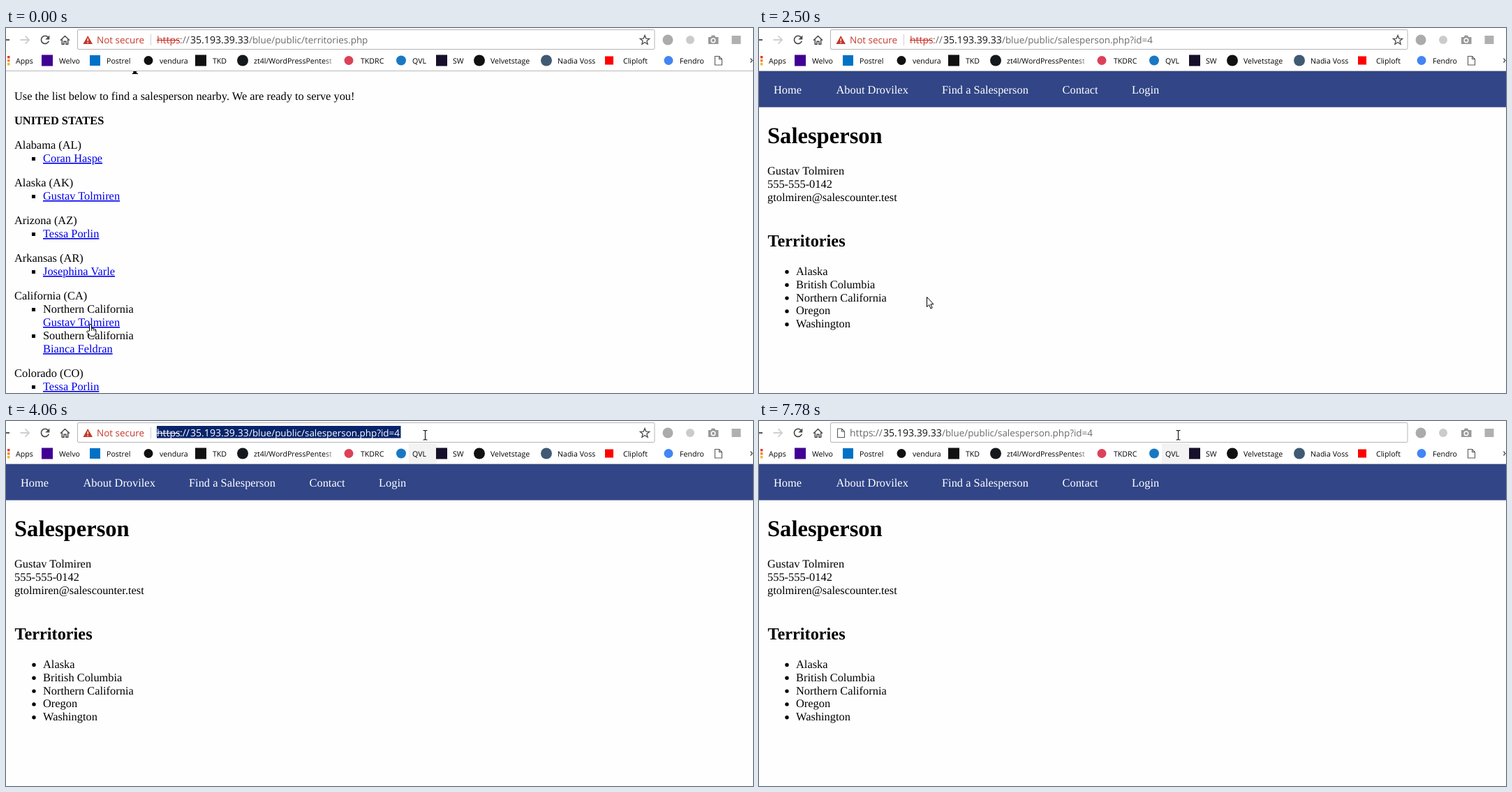
Write an HTML page that moves like this. It is 1070 px wide and 523 px high and loops after 8000 ms.

```html
<!DOCTYPE html>
<html>
<head>
<meta charset="utf-8">
<style>
  html, body { margin: 0; width: 100%; height: 100%; overflow: hidden; background: #fefefe; }
  svg { display: block; }
  text { white-space: pre; text-rendering: geometricPrecision; }
  .page text { font-family: "Liberation Serif", "Times New Roman", serif; }
  .ui text { font-family: "Open Sans", "Noto Sans", sans-serif; }
  .hidden { display: none; }
</style>
</head>
<body>
<svg id="stage" width="1070" height="523" viewBox="0 0 1070 523"></svg>
<script>
const LOOP = 8000, BODY = 16.4;

const text = (x, y, str, size = BODY, fill = "#000", extra = "") =>
  `<text x="${x}" y="${Math.round(y)}" font-size="${size}" fill="${fill}" ${extra}>${str}</text>`;
const rect = (x, y, w, h, fill, extra = "") =>
  `<rect x="${x}" y="${y}" width="${w}" height="${h}" fill="${fill}" ${extra}/>`;
const circle = (x, y, r, fill) => `<circle cx="${x}" cy="${y}" r="${r}" fill="${fill}"/>`;
const path = (d, stroke, width = 1, fill = "none") =>
  `<path d="${d}" stroke="${stroke}" stroke-width="${width}" fill="${fill}"/>`;
const group = (id, content, cls = "") => `<g id="${id}" class="${cls}">${content}</g>`;
const bold = 'font-weight="bold"';

// Territory list: each entry is a state and its lines; links start with "@"
const agent = "Gustav Tolmiren";
const states = [
  ["Alabama (AL)", "@Coran Haspe"],
  ["Alaska (AK)", "@" + agent],
  ["Arizona (AZ)", "@Tessa Porlin"],
  ["Arkansas (AR)", "@Josephina Varle"],
  ["California (CA)", "Northern California", "@" + agent, "Southern California", "@Bianca Feldran"],
  ["Colorado (CO)", "@Tessa Porlin"],
];

function territoriesPage() {
  let out = text(12, 59, "Find a Salesperson", 32.6, "#000", bold)
    + text(12, 103, "Use the list below to find a salesperson nearby. We are ready to serve you!")
    + text(12, 138, "UNITED STATES", BODY, "#000", bold);
  let y = 173.3;
  for (const [state, ...lines] of states) {
    out += text(12, y, state);
    lines.forEach((line, i) => {
      y += 18.8;
      const link = line[0] === "@";
      if (i % 2 === 0) out += rect(37, Math.round(y) - 7, 5, 5, "#000");
      out += link
        ? text(53, y, line.slice(1), BODY, "#00e", 'text-decoration="underline"')
        : text(53, y, line);
    });
    y += 35.2;
  }
  return out;
}

function salespersonPage() {
  const nav = [[21, "Home"], [110.5, "About Drovilex"], [262, "Find a Salesperson"], [434.5, "Contact"], [534, "Login"]];
  const areas = ["Alaska", "British Columbia", "Northern California", "Oregon", "Washington"];
  return rect(0, 62, 1070, 51.5, "#314587")
    + nav.map(([x, label]) => text(x, 94, label, BODY, "#fff")).join("")
    + text(12, 165, "Salesperson", 32.6, "#000", bold)
    + [agent, "555-555-0142", "gtolmiren@salescounter.test"].map((s, i) => text(12, 210 + i * 19, s)).join("")
    + text(12.5, 313, "Territories", 24.3, "#000", bold)
    + areas.map((s, i) => circle(40, 349.5 + i * 18.8, 2.7, "#000") + text(53, 354 + i * 18.8, s)).join("");
}

// The address, in pieces; `selected` overrides all colours
function address(dx, file, scheme, selected) {
  const insecure = scheme === "red";
  const rest = selected || "#6a6a6a";
  return text(216 + dx, 22, "https", 14, selected || (insecure ? "#c5392b" : "#6a6a6a"))
    + (insecure ? path(`M${216 + dx} 17.5h32`, selected || "#c5221f") : "")
    + text(249 + dx, 22, "://", 14, rest)
    + text(264 + dx, 22, "35.193.39.33", 14.1, selected || "#111")
    + text(348 + dx, 22, "/blue/public/", 13.4, rest)
    + text(428 + dx, 22, file, 13.4, rest);
}

const fileIcon = (x, y) => path(`M${x} ${y}h6l4 4v8.5h-10zM${x + 6} ${y}v4h4`, "#5a5a5a", 1.1, "#fff");

function bookmarks() {
  const items = [
    [14, "Apps"], [76, "Welvo"], [144, "Postrel"], [220, "vendura"], [296, "TKD"],
    [355, "zt4l/WordPressPentest"], [508, "TKDRC"], [582, "QVL"], [640, "SW"],
    [694, "Velvetstage"], [790, "Nadia Voss"], [884, "Cliploft"], [965, "Fendro"],
  ];
  const squares = [[51, 16, "#410093"], [120, 15, "#0072c6"], [271, 16, "#111"], [616, 16, "#16102a"], [858, 12, "#f00"]];
  const discs = [[204, 6.5, "#111"], [339, 8, "#15181c"], [491, 6.5, "#dc4158"], [566, 7, "#1a78c2"],
    [678, 8, "#111"], [774, 8, "#3f5b73"], [949, 6.5, "#4285f4"]];
  return ["#e0402f", "#f0872c", "#f3b72a"].map((c, i) => rect(2, 40 + i * 5, 3.5, 3.5, c)).join("")
    + squares.map(([x, s, c]) => rect(x, 46.5 - s / 2, s, s, c)).join("")
    + items.map(([x, s]) => text(x, 51, s, 10.6, "#000")).join("")
    + rect(456, 38, 16, 18, "url(#fade)") + rect(472, 38, 12, 18, "#fff")
    + discs.map(([x, r, c]) => circle(x, 46.5, r, c)).join("")
    + fileIcon(1015.5, 40.5)
    + path("M1066.5 43.5l2.5 3-2.5 3", "#444", 1.2);
}

function toolbar() {
  const star = Array.from({ length: 10 }, (_, i) => {
    const a = i * Math.PI / 5, r = i % 2 ? 3 : 7;
    return [915 + r * Math.sin(a), 17.5 - r * Math.cos(a)].map(v => v.toFixed(1)).join(" ");
  }).join("L");
  return rect(0, 0, 1070, 61.5, "#fff")
    + path("M0 61.5H1070", "#b9b9b9")
    + group("hoverLeft", rect(49, 32, 80, 29, "#f5f5f5"))
    + group("hoverRight", rect(577, 32, 40, 29, "#f3f3f3"))
    + rect(102.5, 2.5, 826.5, 28, "#fff", 'rx="1.5" stroke="#b4b4b4"')
    + path("M0 17H5", "#444", 1.8)
    + path("M20.5 17H33M27.5 11.3l5.7 5.7-5.7 5.7", "#cfcfcf", 1.8)
    + path("M78 17.8l6.5-6.3 6.5 6.3M80.3 16.5v6.7h2.7v-4h3v4h2.7v-6.7", "#4a4a4a", 1.5)
    + group("reload", path("M60.3 13.2A5.6 5.6 0 1 0 61.3 18.8", "#4a4a4a", 1.7) + path("M62.3 10.5v6h-6z", "none", 0, "#4a4a4a"))
    + group("stop", path("M50.5 11.5l11 11M61.5 11.5l-11 11", "#4a4a4a", 1.8))
    + group("warning",
        path("M117.2 11l6.8 12h-13.6z", "none", 0, "#c5392b")
        + path("M117.2 15v4M117.2 20.2v1.5", "#fff", 1.3)
        + text(130, 22, "Not secure", 13.5, "#c5392b")
        + path("M207.5 9V25", "#cfcfcf")
        + path(`M${star}Z`, "#4a4a4a", 1.3))
    + group("urlOld", address(0, "territories.php", "red"))
    + group("urlNew", address(0, "salesperson.php?id=4", "red"))
    + group("urlSelected", rect(216, 7, 349.5, 17.5, "#08246b") + address(0, "salesperson.php?id=4", "red", "#fff"))
    + group("urlEdited", fileIcon(112.5, 11) + address(-86, "salesperson.php?id=4", "plain"))
    + group("caretEnd", path("M565.5 6V24", "#111"))
    + group("caretEdited", path("M485.5 6V24", "#111"))
    + circle(948, 17, 7.5, "#ababab") + circle(980, 17, 6, "#cbcbcb")
    + path("M1006 13h3.5l1.5-2.5h4l1.5 2.5h4v10h-14.5z", "none", 0, "#999")
    + circle(1013, 17.8, 3.6, "#fff") + circle(1013, 17.8, 2.1, "#999")
    + rect(1039.5, 11, 13, 12, "#b0b0b0")
    + bookmarks();
}

const cursors =
  group("hand", path("M-1.5 2V-6a1.5 1.5 0 0 1 3 0v4.5q1.6-.9 2.6.4 1.6-.5 2.3.9 1.6-.1 1.6 1.6v3.2l-2 5H.2L-5.3 3.4q.3-2 2-1z", "#000", 1, "#fff")
    + path("M1.5-1.5V2M4.1-1V2M6.4 0V2.5", "#000", .8))
  + group("arrow", path("M.5.5V14.5L3.7 11.6 6 17 8.2 16 5.9 10.8H10z", "#000", 1, "#fff"))
  + group("beam", path("M-2.5-6.5h2l1 1 1-1h2M.5-6V6.5M-2.5 7h2l1-1 1 1h2", "#111", 1.1));

document.getElementById("stage").innerHTML =
  '<defs><linearGradient id="fade"><stop stop-color="#fff" stop-opacity="0"/><stop offset="1" stop-color="#fff"/></linearGradient></defs>'
  + group("territories", territoriesPage(), "page")
  + group("salesperson", salespersonPage(), "page")
  + group("toolbar", toolbar(), "ui")
  + group("cursor", cursors);

// Time ranges in ms during which each part is visible
const visible = {
  territories: [[0, 1630]],
  salesperson: [[1630, LOOP]],
  reload: [[0, 540], [1630, LOOP]],
  stop: [[540, 1630]],
  hoverLeft: [[540, 1630]],
  hoverRight: [[3550, LOOP]],
  warning: [[0, 6250]],
  urlOld: [[0, 1470]],
  urlNew: [[1470, 4060], [5080, 6250]],
  urlSelected: [[4060, 5080]],
  urlEdited: [[6250, LOOP]],
  caretEnd: [[3910, 4060], [5080, 5610], [6110, 6250]],
  caretEdited: [[6250, 6690], [7310, 7780]],
};

// The pointer jumps: time, shape, x, y
const pointer = [
  [0, "hand", 121, 432], [540, "arrow", 119, 426], [1630, "hand", 121, 432], [1890, "beam", 122, 425],
  [2500, "arrow", 240, 385], [2630, "arrow", 371, 347], [2770, "arrow", 388, 342],
  [3040, "arrow", 440, 250], [3160, "arrow", 540, 145], [3280, "arrow", 585, 89],
  [3430, "arrow", 606, 66], [3550, "arrow", 608, 44], [3670, "beam", 603, 24], [3790, "beam", 600, 20],
];

const byId = id => document.getElementById(id);
const show = (id, on) => byId(id).classList.toggle("hidden", !on);

function draw() {
  const t = performance.now() % LOOP;
  for (const id in visible) show(id, visible[id].some(([from, to]) => t >= from && t < to));
  const [, shape, x, y] = pointer.filter(p => p[0] <= t).pop();
  for (const id of ["hand", "arrow", "beam"]) show(id, id === shape);
  byId("cursor").setAttribute("transform", `translate(${x} ${y})`);
  requestAnimationFrame(draw);
}
draw();
</script>
</body>
</html>
```
